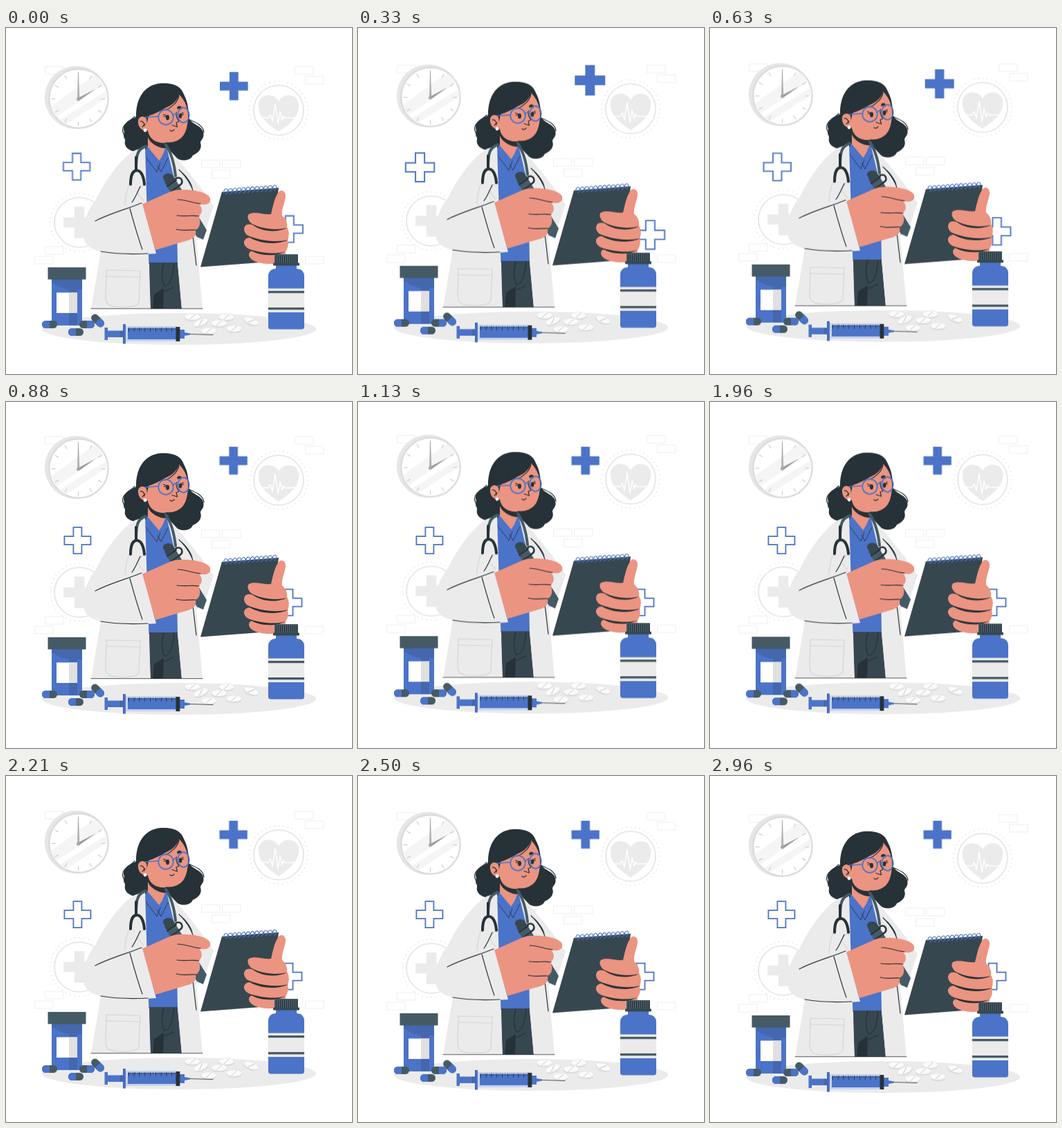
These frames come from a looping animation (500x500 px, 3000 ms). An HTML page:

```html
<!DOCTYPE html>
<html lang="en">
<head>
<meta charset="utf-8">
<title>Doctor taking notes</title>
<style>
  html, body { margin: 0; width: 100%; height: 100%; overflow: hidden; background: #fff; }
  svg { display: block; width: 100vw; height: 100vh; }
  .float { animation: float 3s linear -25ms infinite; }
  .beat { animation: beat 3s linear -25ms infinite; transform-origin: 256px 187px; }
  @keyframes float { 50% { transform: translateY(-10px); } }
  @keyframes beat {
    0%, 30%, 40%, 60%, 100% { transform: scale(1); }
    10%, 50% { transform: scale(1.1); }
  }
  .blue { fill: #4b73c8; }
  .ink { fill: #263238; }
  .slate { fill: #37474f; }
  .steel { fill: #455a64; }
  .skin { fill: #eb9481; }
  .pale { fill: #ebebeb; }
  .line { fill: none; stroke: #263238; stroke-width: 1.2; stroke-linecap: round; stroke-linejoin: round; }
  .thin { stroke-width: .8; }
  .bold { stroke-width: 2; }
  .soft { fill: none; stroke: #d6d6d6; stroke-width: 1.2; }
  .rim { fill: none; stroke: #4b73c8; stroke-width: 1.7; }
  .coil { fill: none; stroke: #4b73c8; stroke-width: 1.1; }
  .ring { fill: #fff; stroke: #e3e3e3; stroke-width: 1.6; }
  .dots { fill: none; stroke: #e3e3e3; stroke-width: 1.7; stroke-linecap: round; stroke-dasharray: 0 6.6; }
  .bricks { fill: none; stroke: #efefef; }
</style>
</head>
<body>
<svg viewBox="0 0 500 500">
  <defs>
    <path id="plus" d="M-6-19H6V-6H19V6H6V19H-6V6H-19V-6H-6Z"/>
    <g id="pill">
      <ellipse cy="1.6" rx="11.3" ry="5" fill="#d9d9d9"/>
      <ellipse rx="11.3" ry="4.8" fill="#fafafa" stroke="#e0e0e0" stroke-width=".6"/>
      <path d="M-4 3.6L4-3.6" stroke="#c9c9c9"/>
    </g>
    <g id="capsule">
      <rect x="-11" y="-5.5" width="22" height="11" rx="5.5" class="steel"/>
      <path class="blue" d="M0-5.5H-5.5A5.5 5.5 0 0 0-5.5 5.5H0Z"/>
    </g>
    <clipPath id="face"><circle cx="105" cy="102" r="42"/></clipPath>
  </defs>

  <!-- backdrop -->
  <g class="float">
    <path class="bricks" id="bricks"/>

    <circle cx="101.5" cy="100.5" r="45.5" fill="#e6e6e6"/>
    <circle cx="105" cy="102" r="42.7" fill="#fff" stroke="#dcdcdc" stroke-width="2.4"/>
    <g clip-path="url(#face)" fill="#f5f5f5">
      <path d="M60 117L131 66L144 80L70 130Z"/>
      <path d="M76 134L150 88L152 97L83 142Z"/>
    </g>
    <circle cx="104.5" cy="102.5" r="36" fill="none" stroke="#c8c8c8" stroke-width="6" pathLength="360" stroke-dasharray="1.6 28.4" stroke-dashoffset=".8"/>
    <path d="M103 104L104 64H105L106.3 104Z" fill="#b0b0b0"/>
    <path d="M104 101.5L129.5 88L105.5 105Z" fill="#999"/>
    <circle cx="104.5" cy="103" r="2.5" fill="#a6a6a6"/>

    <circle class="dots" cx="394" cy="119" r="42"/>
    <circle class="ring" cx="394" cy="119" r="36"/>
    <path class="pale" d="M394 106C389 97 377 94 369 101C362 108 364 121 371 130C377 138 387 145 394 150C401 145 411 138 417 130C424 121 426 108 419 101C411 94 399 97 394 106Z"/>
    <path fill="none" stroke="#fff" stroke-width="1.5" stroke-linejoin="round" d="M370 130H379L382 125L385 135L389 110L393 139L396 121L399 133L401 127L403 130H419"/>

    <circle class="dots" cx="106" cy="281" r="42"/>
    <circle class="ring" cx="106" cy="281" r="36"/>
    <use href="#plus" class="pale" transform="translate(106 281) scale(1.2)"/>
  </g>

  <!-- beating crosses -->
  <g class="beat">
    <use href="#plus" class="blue" transform="translate(328.7 84.8) scale(1.06)"/>
    <g fill="#fff" stroke="#4b73c8" stroke-width="1.8">
      <use href="#plus" x="103.4" y="200.2"/>
      <use href="#plus" x="408.5" y="289.7"/>
    </g>
  </g>

  <g class="float">
    <ellipse class="pale" cx="250" cy="435" rx="198" ry="23"/>

    <!-- hair, neck, shirt, trousers -->
    <path class="ink" d="M188 127C188 104 198 82 224 80C246 79 254 87 257 96C263 107 264 118 264 130C268 140 286 141 285.5 154C286 160 281 162 281 166C284 174 278 181 270 184C267 192 255 193 248 189C240 185 233 184 229 176L205 171C203 178 196 181 188 179C177 178 170 171 172 163C172 158 169 156 171 150C167 142 175 134 183 131C186 130 188 129 188 127Z"/>
    <path class="line" d="M186 128C180 135 169 138 168.5 147C168 152 172 154 171 159M264 132C271 136 285 139 286 151"/>
    <path class="blue" d="M203 172L221 190L233 174L247 215L249 341H205L200 200Z"/>
    <path class="slate" d="M207 339H248L254 406H208Z"/>
    <path class="ink" d="M214 385L228 376L227 406H212Z"/>
    <path class="line" d="M228 340C224 352 225 366 229 373C236 373 241 362 243 340M229 381L242 375"/>
    <path class="skin" d="M205 145V174L221 192L232 176L230 160Z"/>
    <path class="ink" d="M205 149C207 161 219 168 232 166V174C219 174 208 166 205 158Z"/>
    <path class="blue" d="M204 171L199 183L218 208L223 194ZM232 170L234 188L224 208L222 194Z"/>
    <path class="line thin" d="M199 183L218 208L223 195M234 188L224 208L219 199"/>

    <!-- face -->
    <path class="skin" d="M203 131C197 125 190 129 191 137C192 146 199 150 205 148Z"/>
    <path class="skin" d="M206 127C222 122 240 112 250 96C259 105 264 117 263 131C262 147 258 158 247 163C236 168 220 165 212 158C206 152 204 147 203 142Z"/>
    <path class="ink" d="M203 132C205 127 213 120 222 118C237 115 247 107 251 95C246 85 220 84 205 98C193 108 190 122 192 130C197 125 202 127 203 132Z"/>
    <path class="line" d="M250 98C248 107 240 115 230 119M194 135C198 134 200 138 200 142M197 143L201 139"/>
    <circle cx="201" cy="148" r="2.4" fill="#fff"/>
    <path class="ink" d="M247 115C249 112 253 112 254 115L253.5 118C251 116 249 117 248 118Z"/>
    <ellipse class="ink" cx="233.5" cy="129.5" rx="2.5" ry="3.7"/>
    <ellipse class="ink" cx="252" cy="127" rx="2.3" ry="3.6"/>
    <path class="line" d="M227.500 125L232 127M228 128L232 128.500M253 124.500L256 122.500M253.500 126L256.500 125"/>
    <path class="line" d="M246.500 122C245 126 247 131 250 135L246 137L247.500 143L240 140.500M237 148C239 150 241 149 243 147"/>
    <circle class="rim" cx="231" cy="129" r="10.8"/>
    <ellipse class="rim" cx="256.5" cy="126" rx="8.3" ry="10.8"/>
    <path class="rim" d="M201 129L220 128M241.5 127C243 123 246 123 248 125"/>

    <!-- coat -->
    <path class="pale" d="M201 172L186 177C165 189 141 224 130 248C118 262 112 280 112 298C112 313 121 319 137 323L123 406H209L206 330L203 240Z"/>
    <path class="pale" d="M232 172L247 188C262 206 285 234 300 257L288 293L275 306L284 406H254L248 340L246 230Z"/>
    <path class="soft" d="M178 226C174 237 172 247 172 256M203 222L189 237L199 250M145 350L194 351L192 396C190 403 178 404 162 403C150 403 144 399 144 390ZM144 359L193 360"/>
    <path class="line" d="M250 205C261 215 270 230 274 248M268 283L275 343M194 229C190 238 186 247 182 252"/>
    <path class="ink" d="M251 206C260 212 268 223 270 232C264 221 258 214 251 206Z"/>
    <path class="line thin" d="M123 405.700H284"/>

    <!-- stethoscope -->
    <g fill="none" stroke-linecap="round">
      <path stroke="#455a64" stroke-width="4" d="M202 171C190 175 188 184 188 203M231 169C239 181 243 195 245 214"/>
      <path stroke="#263238" stroke-width="4" d="M188 187V205M180 226C180 210 185 206 189 206C195 206 199 214 200 226"/>
      <circle stroke="#263238" stroke-width="2.6" cx="249" cy="222" r="5.5"/>
    </g>

    <!-- pen and writing hand -->
    <path class="steel" d="M229 223L243 216L290 292L285 306L276 302Z"/>
    <path class="slate" d="M227 217C226 211 235 208 240 212L246 220L233 229Z"/>
    <path class="line bold" d="M233 229L246 220M239 236L252 227"/>
    <path class="skin" d="M196 255L239 236C254 231 291 235 295 246C297 255 287 257 278 254C285 259 284 269 278 272C282 279 281 289 274 292C276 303 268 306 256 309L216 321Z"/>
    <path class="line" d="M248 248C260 248 269 253 281 254M247 271C259 273 269 270 279 272M246 291C257 294 266 291 274 292"/>
    <path class="pale" d="M131 278C150 267 175 261 197 254L217 326C190 328 158 327 137 323C124 320 114 306 131 278Z"/>
    <path class="line" d="M129 279C150 268 174 262 196 253M179 261C185 282 190 301 197 320M137 323C160 327 185 327 205 326"/>

    <!-- notepad and holding hand -->
    <path class="slate" d="M312 237L394 231L380 338L281 345.5Z"/>
    <path class="coil" id="coils"/>
    <path class="skin" d="M383 269C386 257 388 245 394 237C399 232 405 237 404 244C403 252 398 262 399 271C405 276 407 282 406 288C410 293 409 302 407 307C409 313 407 319 404 323C404 333 397 341 380 341C365 341 352 336 351 328C351 323 355 322 357 322C347 319 343 313 344 309C345 305 349 303 353 303C346 299 342 292 345 287C347 283 352 283 357 285C351 280 347 273 351 269C360 264 373 271 383 269Z"/>
    <path class="ink" d="M352 281C368 291 389 293 406 289C392 296 368 296 352 281ZM347 299C364 307 389 311 408 306C393 314 363 313 347 299ZM350 319C366 325 388 328 404 323C390 331 364 330 350 319Z"/>

    <!-- bottle -->
    <rect class="blue" x="390" y="341" width="30" height="12"/>
    <path class="blue" d="M389 348H421Q431 349 431 359V432Q431 435.5 427 435.5H383Q379 435.5 379 432V359Q379 349 389 348Z"/>
    <rect class="pale" x="379" y="376.5" width="52" height="34.5"/>
    <path class="steel" d="M379 380H431V383.3H379ZM379 404H431V407.3H379Z"/>
    <rect class="steel" x="388" y="327" width="34" height="14" rx="1"/>
    <path stroke="#263238" stroke-width="11" stroke-dasharray="1 2" d="M390 334H421"/>
    <rect class="slate" x="386" y="339.5" width="38" height="4" rx="1"/>

    <!-- pill jar -->
    <rect class="blue" x="66" y="362" width="44" height="68"/>
    <path d="M66 363H110V378H103V430H91V378C82 377 73 372 66 367Z" fill="#263238" opacity=".18"/>
    <rect x="73" y="382.5" width="30" height="29.5" fill="#fff"/>
    <rect x="91" y="382.5" width="12" height="29.5" fill="#e0e0e0"/>
    <rect class="steel" x="60.5" y="346" width="55" height="17.5"/>
    <use href="#capsule" x="63" y="428.5"/>
    <use href="#capsule" transform="translate(117 428.5) rotate(180)"/>
    <use href="#capsule" x="101" y="439.5"/>
    <use href="#capsule" transform="translate(132.5 423) rotate(225)"/>

    <!-- tablets -->
    <use href="#pill" x="269.5" y="417.5"/>
    <use href="#pill" x="318.5" y="417.5"/>
    <use href="#pill" transform="translate(281.5 425.5) rotate(-22)"/>
    <use href="#pill" x="308" y="426.5"/>
    <use href="#pill" transform="translate(354.5 423.5) rotate(20)"/>
    <use href="#pill" x="329.5" y="434.5"/>
    <use href="#pill" x="293" y="437.5"/>

    <!-- syringe -->
    <path class="line thin" d="M266 442.5L299 443.5"/>
    <rect x="173" y="431" width="74" height="22" fill="#c9d3ee"/>
    <rect class="blue" x="176" y="434" width="71" height="16"/>
    <g stroke="#263238">
      <path stroke-width="3.5" stroke-dasharray=".6 2" d="M177 434.5H245"/>
      <path stroke-width="6" stroke-dasharray=".8 7" d="M177 436H245"/>
    </g>
    <path class="blue" d="M142.5 433H147V437.5H169V428H173V456.5H169V447H147V451H142.5ZM251 436H258V440L266 441.5V443.5L258 445V449H251Z"/>
    <path d="M165 437.5H169V447H165ZM169 428H170.5V456.5H169Z" fill="#263238" opacity=".2"/>
    <rect class="ink" x="245.5" y="432" width="5.8" height="21"/>
  </g>
</svg>
<script>
  const repeat = (n, part) => Array.from({ length: n }, (_, i) => part(i)).join("");
  const draw = (id, d) => document.getElementById(id).setAttribute("d", d);

  // Brick corners: x, y
  const bricks = [
    [56, 56], [417, 56], [432, 70], [282, 191], [312, 191],
    [297, 206], [56, 316], [41, 330], [432, 330]
  ];
  draw("bricks", bricks.map(([x, y]) => `M${x}.5 ${y}h26.5v11h-26.5z`).join(""));

  // Spiral binding along the slanted top edge
  draw("coils", repeat(12, i => {
    const x = 315 + i * 6.4, y = 239 - i * 0.47;
    return `M${x} ${y}c-1-6 3-8 5-5.5c1 3-1 6.500-3 7`;
  }));
</script>
</body>
</html>
```
